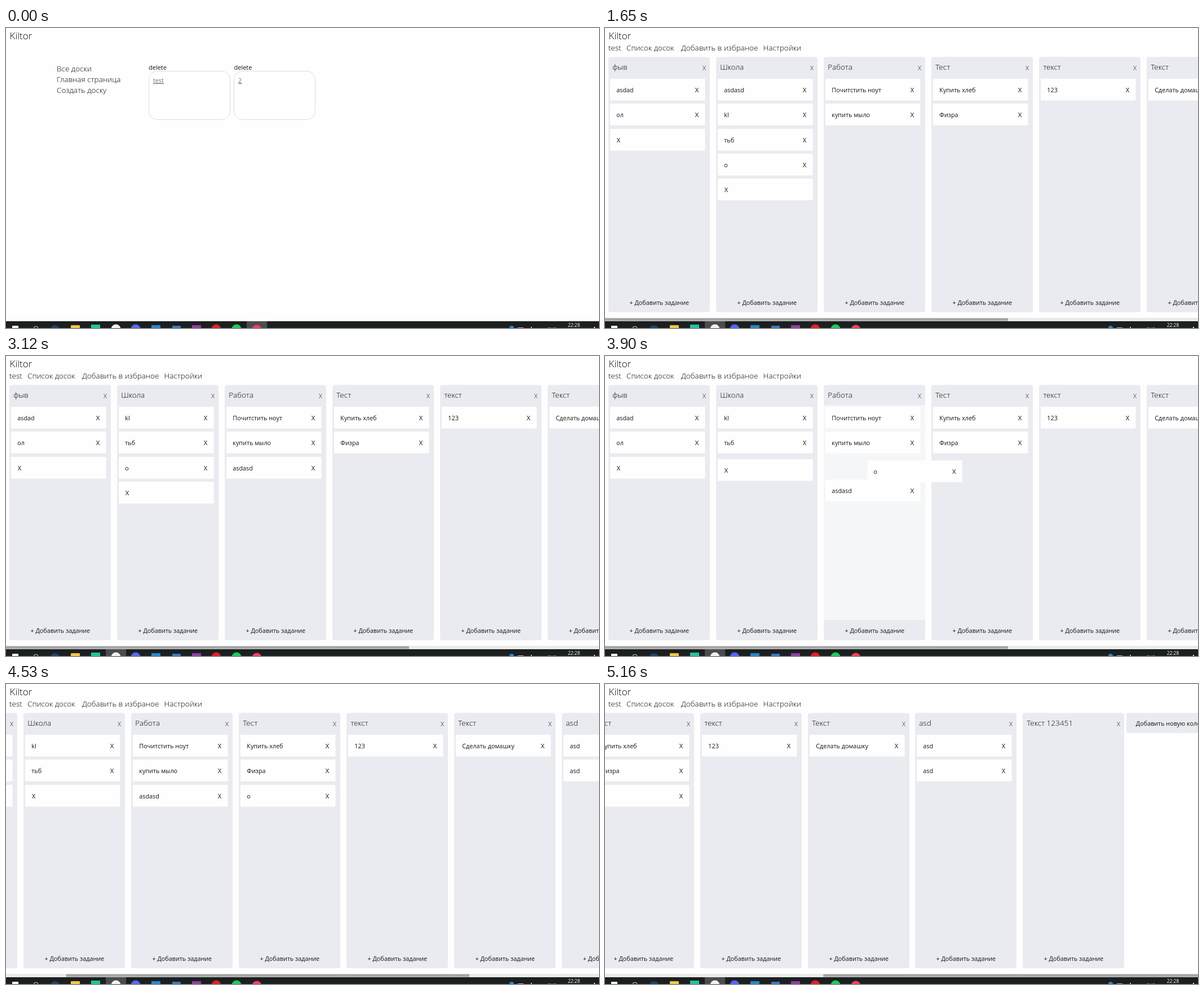
Animation, 1052 px wide and 532 px high, one loop 8000 ms. Source, as an HTML page with a canvas:

```html
<!DOCTYPE html>
<html lang="ru">
<head>
<meta charset="utf-8">
<title>Kiltor</title>
<style>
  html, body { margin: 0; width: 100%; height: 100%; overflow: hidden; background: #fefefe; }
  canvas { display: block; }
</style>
</head>
<body>
<canvas id="stage" width="1052" height="532"></canvas>
<script>
const ctx = document.getElementById('stage').getContext('2d');
const LOOP = 8000, PITCH = 190.9, SLOT = 44.3, FAMILY = '"Open Sans", "Noto Sans", sans-serif';
const GREY = '#eaebf0', LIGHT = '#f5f6f8', INK = '#141618';

const columns = [
  ['фыв', 'asdad', 'ол', ''],
  ['Школа', 'asdasd', 'kl', 'тьб', 'o', ''],
  ['Работа', 'Почитстить ноут', 'купить мыло'],
  ['Тест', 'Купить хлеб', 'Физра'],
  ['текст', '123'],
  ['Текст', 'Сделать домашку'],
  ['asd', 'asd', 'asd'],
  ['Текст 123451']
];

// hovers: column, gap index, enter time, leave time; path: time, x, y
const drags = [
  { name: 'asdasd', from: 1, to: 2, start: 2580, end: 3090,
    hovers: [[1, 0, 2580, 2730], [2, 2, 2730, 3000]],
    path: [[2550, 200, 90], [2580, 234, 124], [2700, 320, 158], [2850, 406, 187], [2940, 406, 187], [3090, 391, 179]] },
  { name: 'o', from: 1, to: 3, start: 3660, end: 4170,
    hovers: [[1, 2, 3660, 3780], [2, 2, 3780, 3930], [3, 2, 3930, 4080]],
    path: [[3660, 200, 179], [3720, 236, 183], [3960, 540, 186], [4050, 590, 184], [4170, 582, 179]] }
];
const scrollPath = [[4260, 0], [4350, 59], [4440, 118], [4470, 124], [4770, 330], [5040, 540], [5160, 601.3]];

const clamp = v => Math.max(0, Math.min(1, v));
const ease = v => { v = clamp(v); return v * v * (3 - 2 * v); };

function follow(path, t, k = 1) {
  if (t <= path[0][0]) return path[0][k];
  for (let i = 1; i < path.length; i++) {
    const a = path[i - 1], b = path[i];
    if (t < b[0]) return a[k] + (b[k] - a[k]) * (t - a[0]) / (b[0] - a[0]);
  }
  return path[path.length - 1][k];
}

function text(str, x, y, size = 10.8, color = INK, weight = 400, align = 'left') {
  ctx.font = `${weight} ${size}px ${FAMILY}`;
  ctx.textAlign = align;
  ctx.fillStyle = color;
  ctx.fillText(str, x, y);
}
const thin = (str, x, y, size = 13.5) => text(str, x, y, size, '#08090a', 300);

function rect(x, y, w, h, color, radius = 0) {
  ctx.fillStyle = color;
  ctx.beginPath();
  ctx.roundRect(x, y, w, h, radius);
  ctx.fill();
}

function circle(x, y, r, color) {
  ctx.fillStyle = color;
  ctx.beginPath();
  ctx.arc(x, y, r, 0, 7);
  ctx.fill();
}

function drawBoardList(alpha) {
  ctx.globalAlpha = alpha;
  ['test', '2'].forEach((name, i) => {
    const x = 253.5 + i * 151;
    ctx.strokeStyle = '#dcdcde';
    ctx.lineWidth = 1;
    ctx.beginPath();
    ctx.roundRect(x, 76.5, 144, 86, 15);
    ctx.stroke();
    text(name, x + 7.5, 97, 10.8, '#777479');
    rect(x + 7.5, 98, i ? 6.5 : 19, 1, '#6b3c8c');
  });
  ctx.globalAlpha = 1;
}

function drawHome() {
  ['Все доски', 'Главная страница', 'Создать доску'].forEach((s, i) => thin(s, 90, 76.5 + i * 19));
  text('delete', 253, 73.5, 11);
  text('delete', 404.5, 73.5, 11);
  drawBoardList(1);
}

function drawNav() {
  thin('test', 6, 40);
  thin('Список досок', 38, 40);
  thin('Добавить в избраное', 135, 40);
  thin('Настройки', 280.5, 40);
}

function drawStatus(alpha) {
  if (alpha <= 0) return;
  ctx.globalAlpha = alpha;
  rect(-2, 503, 248, 18, '#d3d4d6', 2);
  rect(-2, 504, 247, 17, '#f0f1f2', 2);
  text('localhost:3000/boards/3d6681c-c58a-7bee-1e7c-00066cb5d3a', 4, 514.5, 8.3, '#66696c');
  ctx.globalAlpha = 1;
}

function drawCard(name, x, y) {
  rect(x, y, 168.5, 38.5, '#fefefe', 1);
  if (name) text(name, x + 11.3, y + 24.2);
  text('X', name ? x + 153.9 : x + 15, y + 24.2, 11.3, INK, 400, 'center');
}

function columnCards(index, t) {
  let cards = columns[index].slice(1);
  for (const d of drags) {
    if (t >= d.start && d.from === index) cards = cards.filter(c => c !== d.name);
    if (t >= d.end && d.to === index) cards.push(d.name);
  }
  return cards;
}

function drawColumn(index, t, drag, scroll) {
  const x = Math.round(6.3 + index * PITCH - scroll);
  rect(x, 51.5, 180, 452.5, GREY, 4);
  let gapAt = 99, gap = 0;
  (drag ? drag.hovers : []).forEach(([col, at, enter, leave], order) => {
    if (col !== index) return;
    gapAt = at;
    gap = (order ? ease((t - enter) / 150) : 1) - ease((t - leave) / 150);
    if (t >= enter && t < leave) rect(x, 87, 180, 381, LIGHT);
  });
  thin(columns[index][0], x + 7.2, 73.7);
  text('X', x + 170, 75.4, 11.2, '#1c1e20', 300, 'center');
  columnCards(index, t).forEach((name, i) =>
    drawCard(name, x + 3, Math.round(90 + SLOT * (i + (i >= gapAt ? gap : 0)))));
  text('+ Добавить задание', x + 90.3, 491, 10.8, INK, 400, 'center');
}

function drawBoard(t) {
  const scroll = follow(scrollPath, t);
  const drag = drags.find(d => t >= d.start && t < d.end);
  columns.forEach((_, i) => drawColumn(i, t, drag, scroll));
  const addX = Math.round(1526.2 - scroll);
  rect(addX, 51.5, 190, 35.5, GREY, 2);
  text('Добавить новую колонку', addX + 16.8, 73.7);
  if (drag) drawCard(drag.name, follow(drag.path, t, 1), follow(drag.path, t, 2));
  rect(0, 514, 1052, 6, '#ebebeb');
  rect(scroll * 0.644, 514.5, 715, 5, '#a6a6a6');
}

function drawTaskbar(t) {
  rect(0, 520, 1052, 12, '#1c1f1f');
  rect(t < 570 ? 427 : 177, 520, 36, 12, '#4a4d4d');
  rect(11, 528, 11, 11, '#f4f4f4');
  ctx.strokeStyle = '#d8d8d8';
  ctx.lineWidth = 1;
  ctx.beginPath();
  ctx.arc(53, 533, 4, 0, 7);
  ctx.stroke();
  circle(87, 535, 8, '#23406b');
  rect(115, 527, 16, 8, '#f3c54b', 1);
  rect(151, 526, 16, 10, '#22c3a0');
  circle(195, 534, 8.5, '#f2f0f0');
  circle(230, 534, 8.5, '#5865f2');
  rect(258, 527, 16, 10, '#2489ca');
  rect(295, 528, 15, 8, '#3f77c8');
  rect(330, 527, 16, 10, '#8d3fa6');
  circle(373, 534, 8.5, '#e11f2d');
  circle(409, 534, 8.5, '#1fc85c');
  circle(445, 535, 8.5, '#ee3f5e');
  circle(897, 532, 4, '#2f83d0');
  rect(908, 531, 10, 1, '#b9bbbb');
  rect(931, 530, 2, 2, '#b9bbbb');
  rect(1043, 530, 2, 2, '#e4e4e4');
  text('РУС', 961, 536, 8, '#d5d6d6');
  text('22:28', 1007.5, 530, 8.4, '#ffffff', 400, 'center');
}

function draw(t) {
  rect(0, 0, 1052, 532, '#fefefe');
  thin('Kiltor', 6.5, 19.5, 17);
  if (t < 1080) drawHome();
  else {
    drawNav();
    if (t < 1440) {
      text('...loading', 0, 64, 10.9);
      drawBoardList(0.07);
    } else drawBoard(t);
  }
  drawStatus(clamp((t - 720) / 150) - clamp((t - 1440) / 150));
  drawTaskbar(t);
}

function tick() {
  draw(performance.now() % LOOP);
  requestAnimationFrame(tick);
}
tick();
</script>
</body>
</html>
```
